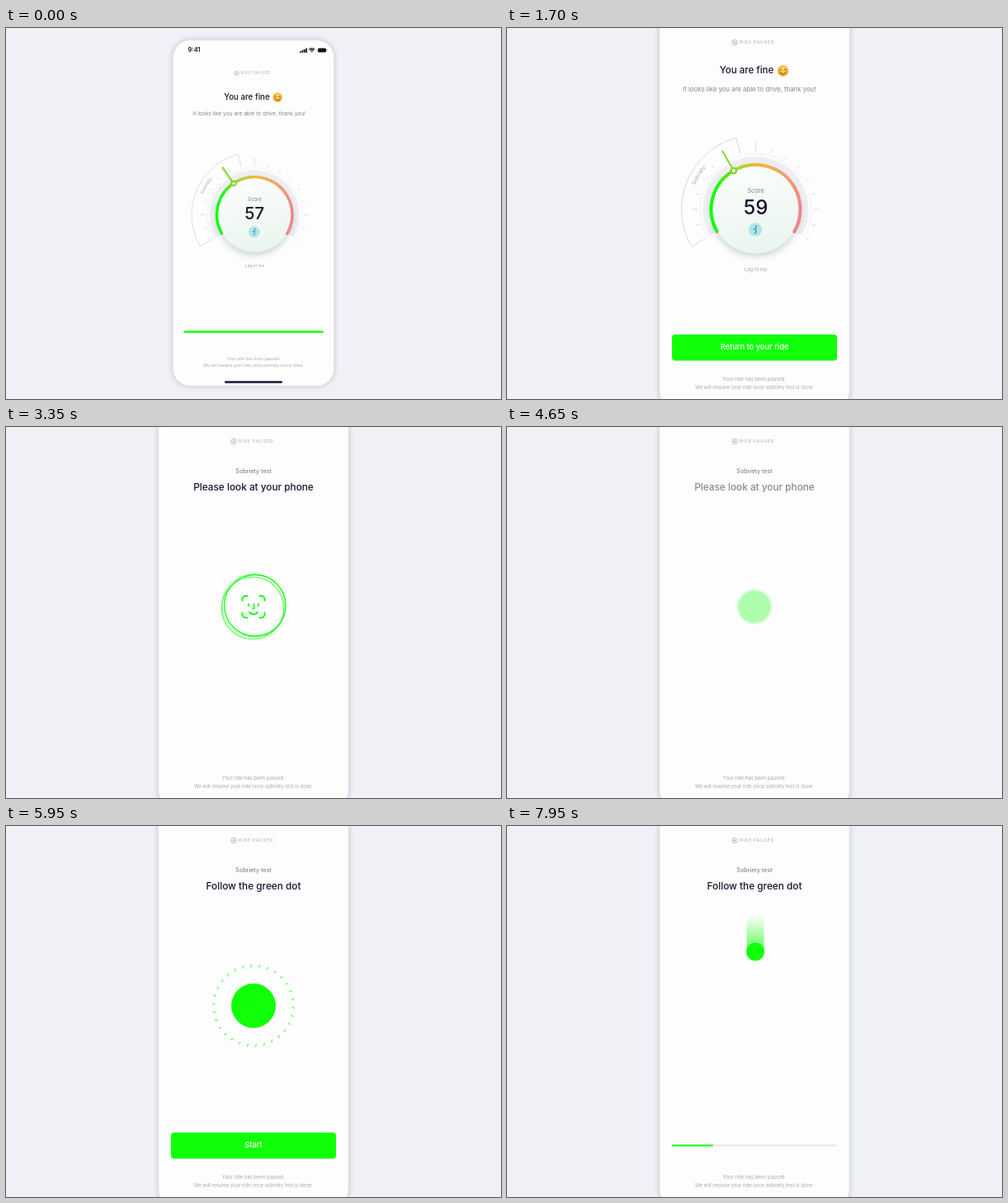
These frames come from a looping animation (600 by 450 pixels, 8 s). An HTML page with a canvas:

```html
<!DOCTYPE html>
<html lang="en">
<head>
<meta charset="utf-8">
<title>Sobriety test</title>
<style>
  html, body { margin: 0; width: 100%; height: 100%; overflow: hidden; background: #eff1f6; }
  canvas { display: block; width: 600px; height: 450px; }
</style>
</head>
<body>
<canvas id="stage"></canvas>
<script>
const LOOP = 8000, STEP = 50;
const GREEN = '#12ff0a', INK = '#17162b', GRAY = '#85858d', PALE = '#a9a9b1';
const TAU = Math.PI * 2, rad = deg => deg * Math.PI / 180;
const CX = 300, CY = 218;                // centre of the test screens
const DIAL = { x: 301.5, y: 220, r: 54 };

const canvas = document.getElementById('stage');
const ctx = canvas.getContext('2d');
const dpr = window.devicePixelRatio || 1;
canvas.width = 600 * dpr;
canvas.height = 450 * dpr;

const inOut = u => u < .5 ? 4 * u ** 3 : 1 - 4 * (1 - u) ** 3;
const out = u => 1 - (1 - u) ** 3;
const linear = u => u;
const ramp = (t, from, to, ease = linear) => ease(Math.min(1, Math.max(0, (t - from) / (to - from))));
const mix = (a, b, u) => a + (b - a) * u;

function text(str, x, y, size, color, { weight = 400, align = 'center', spacing = 0 } = {}) {
  ctx.font = `${weight} ${size}px Inter, sans-serif`;
  ctx.letterSpacing = spacing + 'px';
  ctx.textAlign = align;
  ctx.textBaseline = 'middle';
  ctx.fillStyle = color;
  ctx.fillText(str, x, y);
}

function rounded(x, y, w, h, r, color) {
  ctx.beginPath();
  ctx.roundRect(x, y, w, h, r);
  ctx.fillStyle = color;
  ctx.fill();
}

function disc(x, y, r, color) {
  ctx.beginPath();
  ctx.arc(x, y, r, 0, TAU);
  ctx.fillStyle = color;
  ctx.fill();
}

function arc(x, y, r, from, to, color, width) {
  ctx.beginPath();
  ctx.arc(x, y, r, from, to);
  stroke(color, width);
}

function stroke(color, width) {
  ctx.strokeStyle = color;
  ctx.lineWidth = width;
  ctx.stroke();
}

function layer(alpha, draw) {
  if (alpha <= 0) return;
  ctx.save();
  ctx.globalAlpha *= alpha;
  draw();
  ctx.restore();
}

function spoke(angle, r0, r1, color, width) {
  const c = Math.cos(angle), s = Math.sin(angle);
  ctx.beginPath();
  ctx.moveTo(DIAL.x + c * r0, DIAL.y + s * r0);
  ctx.lineTo(DIAL.x + c * r1, DIAL.y + s * r1);
  stroke(color, width);
}

function phone() {
  ctx.save();
  ctx.shadowColor = 'rgba(60,65,90,.22)';
  ctx.shadowBlur = 5 * dpr;
  rounded(183.4, -31.4, 233.2, 498, 26, '#e1e3e8');
  ctx.restore();
  rounded(185.4, -29.4, 229.2, 494, 24, '#fdfdfe');

  text('9:41', 215, -15.6, 8.8, '#111', { weight: 600 });
  for (let i = 0; i < 4; i++) rounded(366 + i * 2.9, -14 - i * 1.5, 2.1, 1.9 + i * 1.5, .5, '#111');
  for (const r of [1.2, 3.6, 6]) arc(383.5, -12.4, r, rad(-135), rad(-45), '#111', 1.5);
  rounded(392, -18.6, 12, 6, 1.8, '#111');
  rounded(404.6, -16.8, 1, 2.4, .4, '#777');
  rounded(258.7, 458.2, 82.6, 3, 1.5, INK);

  arc(276, 17.5, 3.2, 0, TAU, PALE, .8);
  disc(276, 17.5, 1.2, PALE);
  text('RIDE PAUSED', 282, 17.6, 5.2, PALE, { align: 'left', spacing: .8 });
  text('Your ride has been paused.', CX, 426.5, 5.9, PALE);
  text('We will resume your ride once sobriety test is done.', CX, 436.2, 5.9, PALE);
}

function smiley(x, y, r) {
  const g = ctx.createRadialGradient(x, y - 2, 1, x, y, r);
  g.addColorStop(0, '#ffe36a');
  g.addColorStop(1, '#f3a92c');
  disc(x, y, r, g);
  for (const side of [-1, 1]) {
    disc(x + side * 4, y + 1.4, 1.5, '#f59a4a');
    arc(x + side * 2.4, y - .6, 1.2, Math.PI, TAU, '#6b3d13', .9);
  }
  arc(x, y + .6, 3.3, rad(15), rad(165), '#6b3d13', 1);
}

function curvedText(str, angle, r) {
  ctx.font = '400 6.6px Inter, sans-serif';
  ctx.letterSpacing = '0px';
  let offset = -ctx.measureText(str).width / 2;
  for (const ch of str) {
    const w = ctx.measureText(ch).width;
    ctx.save();
    ctx.translate(DIAL.x, DIAL.y);
    ctx.rotate(angle + (offset + w / 2) / r + Math.PI / 2);
    text(ch, 0, -r, 6.6, PALE);
    ctx.restore();
    offset += w;
  }
}

function gauge(t) {
  const { x, y, r } = DIAL, start = rad(150), end = rad(390);
  const faint = '#d3d4da';

  ctx.lineCap = 'butt';
  arc(x, y, 67.5, start, end, '#eeeef2', .8);
  arc(x, y, 59, start, end, '#eeeff3', 10);
  for (let deg = 150; deg <= 390; deg += 15) {
    if (deg === 150 || deg === 255) continue;
    const length = deg === 270 ? 10.5 : deg % 90 ? 4.5 : 6.5;
    spoke(rad(deg), 70.5, 70.5 + length, faint, .9);
  }

  ctx.beginPath();
  ctx.moveTo(x + 70.5 * Math.cos(start), y + 70.5 * Math.sin(start));
  ctx.arc(x, y, 90, start, rad(254.7));
  ctx.lineTo(x + 70.5 * Math.cos(rad(254.7)), y + 70.5 * Math.sin(rad(254.7)));
  ctx.lineJoin = 'round';
  stroke(faint, .9);
  curvedText('Sobriety', rad(211), 81);

  const face = ctx.createLinearGradient(x - 20, y - r, x + 10, y + r);
  face.addColorStop(0, '#fbfdfc');
  face.addColorStop(1, '#eaf5ef');
  ctx.save();
  ctx.shadowColor = 'rgba(70,110,90,.3)';
  ctx.shadowBlur = 9 * dpr;
  ctx.shadowOffsetY = 3 * dpr;
  disc(x, y, r - .5, face);
  ctx.restore();

  const colors = ctx.createConicGradient(start, x, y);
  [[0, GREEN], [.17, GREEN], [.25, '#86d41d'], [.333, '#f0b021'], [.44, '#f4955a'], [.54, '#f27a78'], [.67, '#f0767e']]
    .forEach(([at, color]) => colors.addColorStop(at, color));
  ctx.lineCap = 'round';
  arc(x, y, r, start, end, colors, 4);

  // fine notches on the part still ahead of the needle
  const needle = rad(mix(236.3, 240.3, ramp(t, 0, 800, out)));
  ctx.lineCap = 'butt';
  ctx.setLineDash([.5, 1.6]);
  arc(x, y, r, needle, end, 'rgba(255,255,255,.4)', 4);
  ctx.setLineDash([]);

  ctx.lineCap = 'round';
  layer(.45 * (1 - ramp(t, 0, 500)), () => spoke(needle - .012, 57, 81, '#78d822', 3.6));
  spoke(needle, 57, 81.5, '#78d822', 1.8);
  const kx = x + r * Math.cos(needle), ky = y + r * Math.sin(needle);
  disc(kx, ky, 4.3, '#80d620');
  disc(kx, ky, 2, '#fff');

  text('Score', x, 198, 7.4, GRAY);
  text(t < 250 ? '57' : t < 700 ? '58' : '59', x, 219, 24, INK, { weight: 500 });
  disc(301, 244.5, 8, '#b0e4eb');
  disc(301.8, 240.8, 1.1, '#2e8593');
  ctx.beginPath();
  ctx.moveTo(299.4, 243.8);
  ctx.lineTo(301.7, 243.2);
  ctx.lineTo(301.2, 246);
  ctx.lineTo(302.2, 247.2);
  ctx.lineTo(300.5, 249);
  stroke('#2e8593', 1.1);
  text('Lag in ms', x, 293.6, 6.1, PALE);
}

function button(label, open, labelAlpha, color = GREEN) {
  const h = mix(3, 31.6, open);
  rounded(200, 387.6 - h / 2, 200, h, Math.min(4, h / 2), color);
  layer(labelAlpha, () => text(label, CX, 387.5, 9.3, '#fff', { weight: 500 }));
}

function resultScreen(t) {
  layer(1 - ramp(t, 2650, 2950), () => {
    text('You are fine', 290.5, 52, 11.5, INK, { weight: 500 });
    smiley(334.5, 52, 6.7);
    text('It looks like you are able to drive, thank you!', 293.7, 75, 7.8, GRAY);
    gauge(t);
    button('Return to your ride', ramp(t, 50, 650, inOut) - ramp(t, 2650, 2950, inOut),
      ramp(t, 400, 750) - ramp(t, 2600, 2750));
  });
}

function faceIcon() {
  ctx.lineCap = 'round';
  for (const sx of [-1, 1]) for (const sy of [-1, 1]) {
    ctx.beginPath();
    ctx.moveTo(CX + sx * 13.5, CY + sy * 7.5);
    ctx.arcTo(CX + sx * 13.5, CY + sy * 13.3, CX + sx * 7.5, CY + sy * 13.3, 4.5);
    ctx.lineTo(CX + sx * 7.5, CY + sy * 13.3);
    stroke(GREEN, 1.9);
  }
  for (const sx of [-1, 1]) {
    ctx.beginPath();
    ctx.moveTo(CX + sx * 6, CY - 3.3);
    ctx.lineTo(CX + sx * 6, CY - 1.2);
    stroke(GREEN, 1.9);
  }
  ctx.beginPath();
  ctx.moveTo(CX + .6, CY - 3.4);
  ctx.lineTo(CX + .6, CY + 2.2);
  ctx.lineTo(CX - 1, CY + 2.5);
  stroke(GREEN, 1.6);
  arc(CX, CY + 3.2, 6, rad(35), rad(145), GREEN, 1.9);
}

function lookScreen(t) {
  layer(ramp(t, 2950, 3200), () => text('Sobriety test', CX, 54.2, 7.1, GRAY, { weight: 500 }));
  layer(ramp(t, 2950, 3250) - ramp(t, 4500, 4800), () =>
    text('Please look at your phone', CX, 73, 11.8, INK, { weight: 500 }));

  layer(ramp(t, 2950, 3250) - ramp(t, 4300, 4500), faceIcon);
  const radius = mix(30, 37.2, ramp(t, 2900, 3250, out)) + 33 * ramp(t, 3500, 4250, inOut);
  const shown = ramp(t, 2900, 3250) - ramp(t, 3800, 4300);
  [1, .65, .35].forEach((alpha, i) => {
    const angle = rad(-40 + i * 160) + (t - 3350) / 260;
    const shift = 2.4 - i * .5;
    layer(shown * alpha, () =>
      arc(CX + shift * Math.cos(angle), CY + shift * Math.sin(angle), radius + i * .5, 0, TAU, GREEN, 1.3));
  });
}

function ripple(t, start) {
  const u = (t - start) / 1000;
  if (u < 0 || u > 1) return;
  const r = mix(27, 71, out(u));
  layer(.65 * ramp(u, 0, .25) * (1 - ramp(u, .55, 1)) * (1 - ramp(t, 6000, 6150)), () => {
    ctx.lineCap = 'butt';
    for (let i = 0; i < 30; i++) {
      ctx.save();
      ctx.translate(CX, CY);
      ctx.rotate(rad(-87.3 + i * 12 + (u - .5) * 20));
      ctx.beginPath();
      ctx.moveTo(r - 1.8, -1);
      ctx.lineTo(r + 1.6, .9);
      stroke(GREEN, 1.6);
      ctx.restore();
    }
  });
}

const PEAK = 7790;
function dotY(t) {
  if (t < PEAK) return mix(CY, 87, (1 - Math.cos(Math.PI * ramp(t, PEAK - 340, PEAK))) / 2);
  return CY - 131 * Math.cos(TAU * (t - PEAK) / 960);
}

function dotTrail(t, y, r) {
  const before = dotY(t - STEP), move = y - before;
  if (Math.abs(move) < 1) return;
  const tail = before - Math.sign(move) * r;
  const g = ctx.createLinearGradient(0, tail, 0, y);
  g.addColorStop(0, 'rgba(18,255,10,0)');
  g.addColorStop(1, 'rgba(18,255,10,.7)');
  rounded(CX + 1 - r + .5, Math.min(tail, y), 2 * r - 1, Math.abs(y - tail), 3, g);
}

function dotScreen(t) {
  layer(ramp(t, 4800, 5050), () =>
    text('Follow the green dot', CX, 73, 11.8, INK, { weight: 500 }));

  ripple(t, 4750);
  ripple(t, 5750);

  if (t < 6100) {
    layer(ramp(t, 4650, 4800), () =>
      button('Start', ramp(t, 4700, 5050, inOut), ramp(t, 4900, 5100)));
  } else if (t < 6500) {
    const closing = ramp(t, 6100, 6450, inOut);
    button('Start', 1 - closing, 1 - ramp(t, 6100, 6250));
    layer(closing, () => button('', 1 - closing, 0, '#e4e4ea'));
  } else {
    const h = mix(3, 1.9, ramp(t, 6600, 6950));
    rounded(200, 387.5 - h / 2, 200, h, h / 2, '#e6e6ec');
    const done = Math.max(0, (t - 6990) * .052);
    if (done) rounded(200, 387.5 - h / 2, done, h, h / 2, GREEN);
  }

  const r = 27 * ramp(t, 4500, 4900, out) - 16 * ramp(t, 6100, 6500, inOut);
  const y = dotY(t);
  dotTrail(t, y, r);
  layer(ramp(t, 4500, 4950), () => {
    ctx.filter = t < 4900 ? 'blur(1px)' : 'none';
    disc(CX + ramp(t, 7450, 7800), y, r, GREEN);
  });
}

function render(t) {
  ctx.setTransform(dpr, 0, 0, dpr, 0, 0);
  ctx.fillStyle = '#eff1f6';
  ctx.fillRect(0, 0, 600, 450);

  const zoom = mix(.847, 1, ramp(t, 0, 1300, inOut));
  ctx.translate(300, 262.6);
  ctx.scale(zoom, zoom);
  ctx.translate(-300, -262.6);

  phone();
  if (t < 2950) resultScreen(t);
  if (t >= 2900) lookScreen(t);
  if (t >= 4500) dotScreen(t);
}

const begin = performance.now();
function frame() {
  const t = (performance.now() - begin) % LOOP;
  render(Math.floor(t / STEP) * STEP);
  requestAnimationFrame(frame);
}
frame();
</script>
</body>
</html>
```
